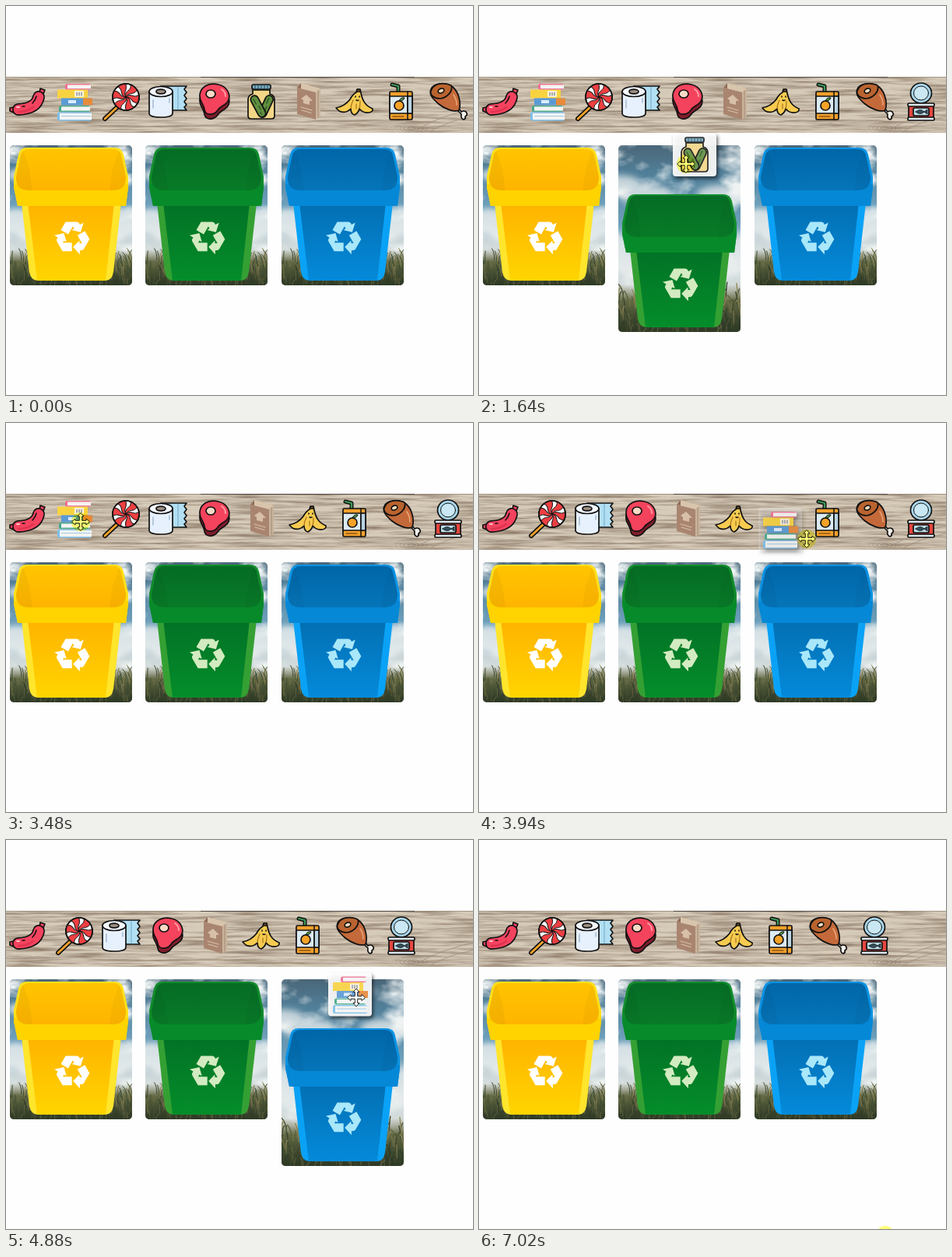
These frames come from a looping animation (600 by 500 pixels, 7.18 s). An HTML page:

```html
<!DOCTYPE html>
<html lang="en">
<head>
<meta charset="utf-8">
<title>Sort the waste</title>
<style>
html, body { margin: 0; width: 100%; height: 100%; overflow: hidden; background: #fefefe; }
svg { display: block; position: absolute; left: 0; top: 0; }
.icon { stroke: #111; stroke-width: 1.7; stroke-linejoin: round; stroke-linecap: round; }
.plain { stroke: none; }
.line { fill: none; }
.ghost { filter: drop-shadow(2px 3px 2px rgba(0, 0, 0, .6)); }
#glow { mix-blend-mode: multiply; }
</style>
</head>
<body>
<svg id="stage" width="600" height="500" viewBox="0 0 600 500"></svg>
<script>
const LOOP = 7180, CELL = 60, BIN_Y = 179, BIN_W = 157, BIN_H = 180, ROOM = 60;
const PICKLES = 5, BOOKS = 1;

// Pointer path: time, x, y
const PATH = [
  [0, 507, 530], [430, 507, 500], [520, 504, 440], [650, 470, 330], [780, 400, 220], [880, 345, 150], [990, 326, 126],
  [1140, 326, 126], [1220, 324, 129], [1300, 318, 141], [1400, 302, 162], [1480, 289, 180], [1570, 275, 194],
  [1640, 266, 203], [1720, 267, 206], [2790, 267, 206], [2950, 250, 200], [3150, 190, 170], [3330, 115, 140],
  [3480, 96, 127], [3540, 100, 127], [3620, 190, 127], [3720, 362, 131], [3870, 395, 141], [3940, 421, 149],
  [4050, 440, 162], [4240, 447, 178], [4330, 449, 195], [4480, 450, 202.5], [6180, 450, 202.5], [6260, 447.5, 215],
  [6400, 455, 285], [6560, 478, 380], [6700, 501, 455], [6810, 519, 503], [6900, 522, 508]
];
const DRAGS = [
  { item: PICKLES, bin: 1, start: 1140, enter: 1480, fly: 2250, end: 2490, grab: [26, 31] },
  { item: BOOKS, bin: 2, start: 3540, enter: 4330, fly: 4940, end: 5240, grab: [36, 32] }
];
const PRESSES = [[990, 2100], [3480, 4880], [7020, LOOP]];
const LAG = 70, SLIDE = 210;

const BINS = [
  { x: 5, deep: '#ffb400', inner: '#ffc400', lip: '#ffe01a', band: '#ffd300', top: '#ffb300', low: '#ffd500', side: '#ffe52c', mark: '#fff' },
  { x: 179, deep: '#087b27', inner: '#056c25', lip: '#128c2c', band: '#078b2a', top: '#027226', low: '#048d2a', side: '#34a033', mark: '#d3ebc0' },
  { x: 354, deep: '#0575b9', inner: '#0166a8', lip: '#0a93e4', band: '#0588d6', top: '#036fb2', low: '#048ada', side: '#0aa2f6', mark: '#a9e7fa' }
];

function random(seed) {
  return () => (seed = (seed * 16807) % 2147483647) / 2147483647;
}
const path = (d, fill, extra = '') => `<path d="${d}" fill="${fill}" ${extra}/>`;
const rect = (x, y, w, h, fill, extra = '') => `<rect x="${x}" y="${y}" width="${w}" height="${h}" fill="${fill}" ${extra}/>`;
const oval = (x, y, rx, ry, fill, extra = '') => `<ellipse cx="${x}" cy="${y}" rx="${rx}" ry="${ry}" fill="${fill}" ${extra}/>`;
const line = (d, stroke = '#111', w = 1.5) => `<path class="line" d="${d}" style="stroke:${stroke};stroke-width:${w}"/>`;
const bare = 'class="plain"';

function sausage() {
  const d = 'M14 -6Q11 9 -12 10';
  return path('M15 -11L16 -17L22 -15L19 -8Z', '#f2435c') + path('M-18 7L-23 8L-23 12L-18 14Z', '#f2435c') +
    line(d, '#111', 16) + line(d, '#f4435f', 12.6) + line('M-12 13Q-1 13 7 7', '#e03350', 2.5) +
    line('M11 -7Q10 -2 6 2M-7 6L-4 6') + line('M-14 7L-11 7', '#ffc0c8', 2);
}
function books() {
  const pages = (x, y, w, h, c) => rect(x, y, w, h, c, 'rx="2.5"') + rect(x + 3, y + 1.4, w - 3, h - 2.8, '#f6f4f2');
  return `<g ${bare}>` + pages(-12, -23, 33, 7.5, '#ef6f93') + rect(-22, -15.5, 39, 11, '#f9d33f') +
    rect(0, -14, 12, 8, '#fff6dc') + line('M3 -12V-8M6 -12V-8M9 -12V-8', '#6a7690', 1.2) +
    rect(-17, -4.5, 40, 9, '#5b9bd5') + rect(11, -4.5, 12, 9, '#e78a3a') + rect(-8, -2, 10, 4, '#dcecff') +
    pages(-20, 5, 40, 8, '#44a98c') + pages(-22, 13.5, 44, 11, '#7cc0ec') + rect(-17, 18, 38, 1, '#9ccbe8') + '</g>';
}
function lollipop() {
  let s = line('M-4 6L-21 22', '#111', 6) + line('M-4 6L-21 22', '#f5a32a', 2.8) + '<g transform="translate(6 -6)">' +
    oval(0, 0, 17, 17, '#fff');
  for (let a = 0; a < 360; a += 60)
    s += path('M0 0C-3 -9 8 -7 6 -16A17 17 0 0 1 14.5 -9C9 -1 4 -8 0 0Z', '#ee3f42', `transform="rotate(${a})" stroke-width="1"`);
  return s + oval(0, 0, 17, 17, 'none') + '</g>';
}
function paper() {
  return path('M-9 -20H24L21 -16L24 -12L21 -8L24 -4L21 0L24 4L21 7L24 11H6Z', '#b3dff3') +
    path('M-24 -13V15Q-24 20 -9 20Q6 20 6 15V-13Z', '#e7f1fd') + oval(-9, -13, 15, 6.5, '#f4f8ff') +
    oval(-9, -13, 6, 2.8, '#9d8f82') + line('M13 -19V10', '#6fa9c6', 1) + line('M-19 -2V8M2 -4V1', '#9eb6cc', 1.4);
}
function steak() {
  const d = 'M-19 -9C-18 -20 -6 -25 5 -22C18 -19 22 -6 16 1C11 6 7 6 4 11C-1 18 -12 18 -13 10C-14 2 -20 0 -19 -9Z';
  return path(d, '#7d1d2b', 'transform="translate(0 6)"') + path(d, '#f4435c') + oval(-5, -10, 6, 5, '#f8d9c6') +
    line('M9 -16Q14 -13 14 -7', '#ff9aa4', 2);
}
function pickles() {
  const c = (x, y, r) => `<g transform="translate(${x} ${y}) rotate(${r})">` + rect(-5, -15, 10, 30, '#5f8f3f', 'rx="5"') +
    line('M-1 -11V-4M1 0V5M-1 8V11', '#2a4a22', 1.2) + '</g>';
  return path('M-11 -15H11V-10Q17 -8 17 -3V18Q17 22 13 22H-13Q-17 22 -17 18V-3Q-17 -8 -11 -10Z', '#f4d688') +
    c(6, 6, 25) + c(-4, 6, -28) + rect(-12, -22, 24, 6, '#78a9bd', 'rx="2"') +
    line('M-8 -21V-17M-4 -21V-17M0 -21V-17M4 -21V-17M8 -21V-17', '#25485a', 1);
}
function novel() {
  return `<g ${bare}>` + path('M-14 -18L-9 -24L16 -17L10 -12Z', '#d9c4ac') + path('M10 -12L16 -17V18L10 23Z', '#c9b39b') +
    path('M-14 -18L10 -12V23L-14 16Z', '#a98570') + path('M-14 -18L-9 -24V-17Z', '#8f6c5a') +
    path('M-2 -9L6 -1L2 -1V4L-6 2V-2L-9 -4Z', '#d8bfa8') + line('M-9 7L5 11M-8 11L4 14.5', '#d8bfa8', 1.2) +
    line('M13 -14V20', '#9a8371', .8) + '</g>';
}
function banana() {
  return path('M2 -12L3 -16L7 -16L8 -11C10 -2 13 5 23 9Q24 13 18 14Q11 15 6 9Q5 14 0 17Q-5 16 -5 9Q-12 16 -20 12L-24 8Q-13 6 -6 -3Q-3 -9 2 -12Z', '#f6cb50') +
    line('M-2 -2Q-5 4 -5 9M7 -1Q7 5 6 9M2 3V9', '#a87418', 1.2) + line('M1 -7V-6M6 -7V-6M2 -2Q4 -1 5 -2') +
    path('M3 -13L3 -16L7 -16L7 -13Z', '#5a4522', 'stroke-width="1"');
}
function juice() {
  const straw = 'M-4 -14V-20L-12 -22';
  return line(straw, '#111', 5) + line(straw, '#3f9a58', 2.2) + rect(-15, -13, 29, 36, '#f3a02c', 'rx="1.5"') +
    rect(-15, -7, 29, 22, '#dceaf3') + line('M8 -13V23') + rect(8, -7, 6, 22, '#b9d3e2') + oval(-3, 5, 6, 6, '#f5a228') +
    path('M-3 -1Q-1 -6 4 -5Q3 -1 -3 -1Z', '#4f9a45', 'stroke-width="1"') + line('M-11 19H3', '#8a5412', 1.3);
}
function ham() {
  return path('M11 10L17 16Q16 22 20 23Q23 22 22 19Q26 17 23 13Q20 11 17 13L13 8Z', '#f4f1ea') +
    path('M-22 -16C-18 -25 -2 -25 6 -19C14 -12 17 2 14 11C8 14 -5 9 -12 3C-19 -3 -25 -9 -22 -16Z', '#c4693a') +
    path('M-22 -14C-19 -23 -7 -26 4 -21C7 -13 -2 -5 -10 -4C-17 -4 -24 -8 -22 -14Z', '#b9632f') +
    oval(-9, -14, 4, 2.8, '#f6ddbd', 'transform="rotate(-25 -9 -14)"') + line('M7 -9Q11 -3 11 4', '#e9a273', 1.7);
}
function can() {
  return oval(0, -11, 13.5, 13, '#a9d6ea') + oval(0, -11, 9.5, 9, '#c9e8f4', 'stroke-width="1"') +
    path('M-16 4H16V22H-16Z', '#e5473f') + rect(-17, 2, 34, 4, '#dfe9ee', 'rx="1.5"') + rect(-17, 20, 34, 4, '#dfe9ee', 'rx="1.5"') +
    rect(-10, 8, 20, 10, '#bcdce8', 'rx="2"') + path('M-7 13Q-1 8 4 13L8 10V16L4 13Q-1 18 -7 13Z', '#34525f', 'stroke-width=".8"');
}
const ICONS = [sausage, books, lollipop, paper, steak, pickles, novel, banana, juice, ham, can];

function scene() {
  const rnd = random(77), tones = ['#35432c', '#59623c', '#77744a', '#434e30', '#8d8658'];
  let s = rect(0, 0, BIN_W, BIN_H, 'url(#sky)') + rect(0, 0, BIN_W, 145, '#fff', 'filter="url(#cloud)"');
  const puffs = [[20, 38, 22, 9], [46, 48, 26, 10], [125, 47, 30, 9], [8, 98, 24, 16], [150, 98, 22, 18], [80, 115, 70, 16]];
  s += '<g filter="url(#soft)" opacity=".75">' + puffs.map(p => oval(...p, '#eef1f0')).join('') +
    line('M84 2L157 30', '#a9bfca', 3) + '</g>' + rect(0, 134, BIN_W, 46, 'url(#field)');
  // Short blades in rows, darker towards the ground
  for (let i = 0; i < 240; i++) {
    const x = rnd() * BIN_W, y = 146 + i / 240 * 42, h = 7 + rnd() * 12, lean = (rnd() - .5) * 12;
    s += line(`M${x.toFixed(1)} ${y.toFixed(1)}q0 ${(-h * .7).toFixed(1)} ${lean.toFixed(1)} ${(-h).toFixed(1)}`, tones[i % 5], 1);
  }
  return s + rect(0, 134, BIN_W, 46, 'url(#shade)');
}

function bin(b, i) {
  const arm = path('M-15 -9.6L-9 -20H5.5Q7.5 -20 8.4 -18.4L9.5 -16.4L14.2 -19L10.3 -6.8L-1 -9.6L2 -11.6L.4 -14.3L-5.5 -4.1Z', b.mark);
  const arms = [0, 120, 240].map(a => `<g transform="rotate(${a})">${arm}</g>`).join('');
  const fade = (id, a, z) => `<linearGradient id="${id}${i}" x1="0" y1="0" x2="0" y2="1"><stop stop-color="${a}"/><stop offset="1" stop-color="${z}"/></linearGradient>`;
  const wall = 'M17 7L25 30L29 58H22Q7 58 8 42L13 13Z';
  return `<defs>${fade('in', b.inner, b.deep)}${fade('body', b.top, b.low)}
    <clipPath id="clip${i}"><rect id="frame${i}" width="${BIN_W}" height="${BIN_H}" rx="5"/></clipPath></defs>
    <g transform="translate(${b.x} ${BIN_Y})"><g clip-path="url(#clip${i})"><g id="scene${i}">${scene()}</g></g>
    <g id="bin${i}">` +
    path('M15 74L25 163Q27 174 36 174H123Q131 174 133 163L143 74Z', b.side) +
    path('M23 74L35 174H123L134 74Z', `url(#body${i})`) +
    path('M22 3H134Q144 3 146 12L152 40V54L149 78H10L5 54V40L11 12Q13 3 22 3Z', b.lip) +
    path('M5 50H152V54L149 78H10L5 54Z', b.band) +
    path('M24 5H133Q141 5 143 13L149 40Q150 58 131 58H26Q7 58 8 40L14 13Q16 5 24 5Z', `url(#in${i})`) +
    path(wall, '#000', 'opacity=".04"') + path(wall, '#000', 'opacity=".03" transform="translate(157 0) scale(-1 1)"') +
    `<g transform="translate(80.5 118.5)">${arms}</g></g></g>`;
}

function wood() {
  let s = rect(0, 91, 600, 72, '#d6cab9') + rect(0, 91, 600, 72, '#000', 'filter="url(#grain)"') +
    line('M0 91.5H600', '#a09282', 1) + line('M250 91.5H525', '#4f463f', 1);
  for (let k = 1; k < 5; k++)
    s += `<ellipse cx="521" cy="157" rx="${k * 5}" ry="${k * 2}" fill="none" stroke="#6d5c4c" stroke-width=".9" opacity="${.6 - k * .1}"/>`;
  return `<g clip-path="url(#strip)">${s}${line('M600 132Q560 141 535 155M600 142Q570 147 545 161', '#a39280', .9)}</g>`;
}

const icon = k => `<g class="icon">${ICONS[k]()}</g>`;
document.getElementById('stage').innerHTML = `<defs>
  <linearGradient id="sky" x1="0" y1="0" x2="0" y2="1"><stop stop-color="#4a6678"/><stop offset=".15" stop-color="#517f99"/>
    <stop offset=".42" stop-color="#6d9fba"/><stop offset=".65" stop-color="#c6d4d9"/><stop offset=".8" stop-color="#dbdfdb"/></linearGradient>
  <linearGradient id="field" x1="0" y1="0" x2="0" y2="1"><stop stop-color="#6f7050" stop-opacity="0"/><stop offset=".35" stop-color="#616743"/><stop offset="1" stop-color="#38442b"/></linearGradient>
  <linearGradient id="shade" x1="0" y1="0" x2="0" y2="1"><stop offset=".4" stop-color="#263020" stop-opacity="0"/><stop offset="1" stop-color="#263020" stop-opacity=".55"/></linearGradient>
  <filter id="soft"><feGaussianBlur stdDeviation="3"/></filter>
  <filter id="cloud" x="0" y="0" width="1" height="1" color-interpolation-filters="sRGB">
    <feTurbulence type="fractalNoise" baseFrequency=".025 .04" numOctaves="4" seed="4"/>
    <feColorMatrix values="0 0 0 0 .94 0 0 0 0 .96 0 0 0 0 .96 3.6 0 0 0 -1.8"/></filter>
  <filter id="grain" x="0" y="0" width="1" height="1" color-interpolation-filters="sRGB">
    <feTurbulence type="fractalNoise" baseFrequency=".014 .3" numOctaves="4" seed="8"/>
    <feColorMatrix values="0 0 0 0 .45 0 0 0 0 .37 0 0 0 0 .29 1.5 0 0 0 -.57"/></filter>
  <clipPath id="strip"><rect y="91" width="600" height="72"/></clipPath></defs>` +
  wood() + ICONS.map((_, k) => `<g id="item${k}">${icon(k)}</g>`).join('') + BINS.map(bin).join('') +
  DRAGS.map((d, i) => `<g id="ghost${i}" class="ghost"><rect id="card${i}" width="56" height="56" rx="4" fill="#fff"/>
    <g transform="translate(28 28)" opacity=".9">${icon(d.item)}</g></g>`).join('') +
  `<g id="pointer"><path id="arrow" d="M0 0V16.5L3.8 13L6.4 19L9.2 17.8L6.7 12H12Z" fill="#fff" stroke="#222" stroke-width=".9"/>
  <path id="move" d="M0 -11.5L4 -7H1.7V-1.7H7V-4L11.5 0L7 4V1.7H1.7V7H4L0 11.5L-4 7H-1.7V1.7H-7V4L-11.5 0L-7 -4V-1.7H-1.7V-7H-4Z" fill="#fff" stroke="#222" stroke-width="1"/></g>
  <circle id="glow" r="12" fill="#ffff78"/>`;

const el = {};
document.querySelectorAll('[id]').forEach(n => el[n.id] = n);
const place = (id, x, y) => el[id].setAttribute('transform', `translate(${x.toFixed(2)} ${y.toFixed(2)})`);
const show = (id, on) => el[id].style.display = on ? '' : 'none';
const clamp = v => Math.max(0, Math.min(1, v));
const easeOut = v => 1 - Math.pow(1 - clamp(v), 3);

function pointer(t) {
  let i = 1;
  while (i < PATH.length - 1 && PATH[i][0] < t) i++;
  const [t0, x0, y0] = PATH[i - 1], [t1, x1, y1] = PATH[i], k = clamp((t - t0) / (t1 - t0));
  return [x0 + (x1 - x0) * k, y0 + (y1 - y0) * k];
}

// Moment at which the dragged books push the item in a slot aside
function swapTime(slot) {
  const d = DRAGS[1];
  let t = d.start;
  while (t < d.enter && pointer(t)[0] < slot * CELL + (slot === 7 ? 5 : 0)) t += 5;
  return t;
}
const SWAPS = ICONS.map((_, slot) => swapTime(slot));

function itemX(k, t) {
  const slot = k > PICKLES && t >= DRAGS[0].enter ? k - 1 : k;
  let x = 28 + slot * CELL;
  if (slot > BOOKS && t >= SWAPS[slot])
    x -= t >= DRAGS[1].enter ? CELL : CELL * easeOut((t - SWAPS[slot]) / SLIDE);
  return x;
}

function draw(t) {
  ICONS.forEach((_, k) => {
    place('item' + k, itemX(k, t), 123);
    show('item' + k, !DRAGS.some(d => d.item === k && t >= d.start));
  });
  BINS.forEach((b, i) => {
    const open = DRAGS.some(d => d.bin === i && t >= d.enter && t < d.end), s = open ? (BIN_H + ROOM) / BIN_H : 1;
    el['frame' + i].setAttribute('height', BIN_H * s);
    el['scene' + i].setAttribute('transform', `translate(${BIN_W / 2 * (1 - s)} 0) scale(${s})`);
    place('bin' + i, 0, open ? ROOM : 0);
  });
  DRAGS.forEach((d, i) => {
    const on = t >= d.start && t < d.end;
    show('ghost' + i, on);
    if (!on) return;
    const [x, y] = pointer(t - LAG), k = easeOut((t - d.fly) / (d.end - d.fly));
    const gx = x - d.grab[0], gy = y - d.grab[1];
    place('ghost' + i, gx + (BINS[d.bin].x + 2 - gx) * k, gy + (BIN_Y + 2 - gy) * k);
    el['card' + i].setAttribute('fill-opacity', t >= d.enter ? .92 : .25);
  });
  const [x, y] = pointer(t);
  const moving = DRAGS.some(d => t >= d.start && t < d.end) || (y > 91 && y < 163);
  show('move', moving);
  show('arrow', !moving);
  place('pointer', x, y);
  place('glow', x, y);
  show('glow', PRESSES.some(([a, z]) => t >= a && t < z));
}

let begin;
function tick(now) {
  if (begin === undefined) begin = now;
  draw((now - begin) % LOOP);
  requestAnimationFrame(tick);
}
draw(0);
requestAnimationFrame(tick);
</script>
</body>
</html>
```
